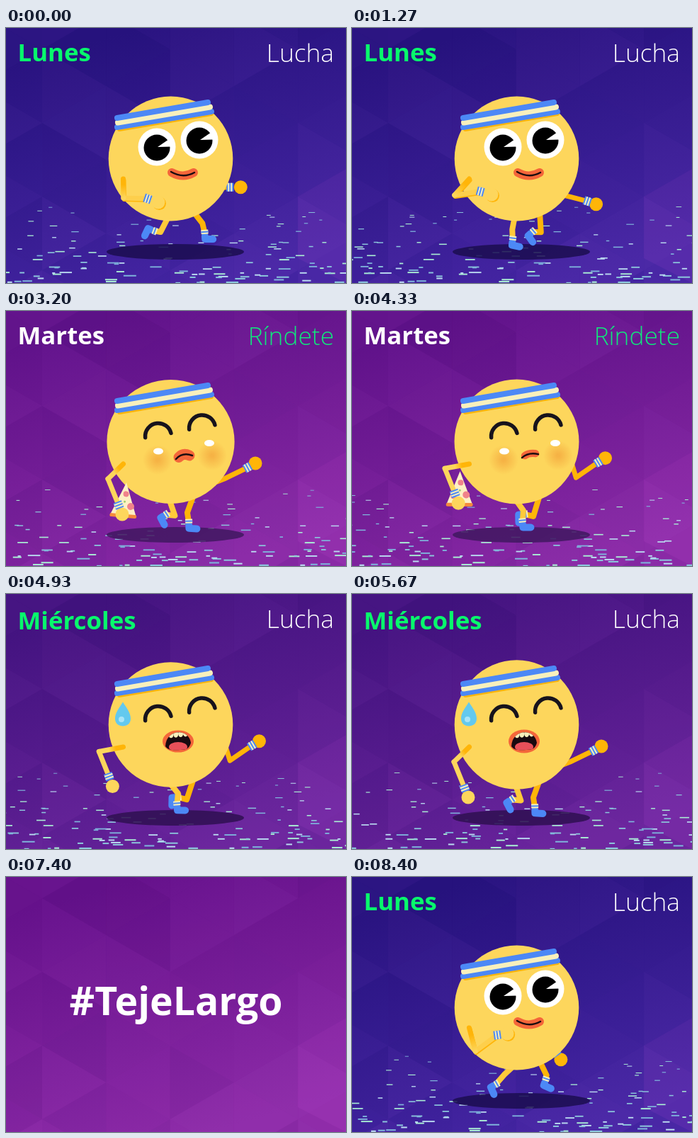
Recreate the animation shown at these times as an HTML page with a canvas. Size 480x360 px, loop 8.47 s.

```html
<!DOCTYPE html>
<html lang="es">
<head>
<meta charset="utf-8">
<style>
html, body { margin: 0; width: 100%; height: 100%; overflow: hidden; background: #2b1785; }
canvas { display: block; }
</style>
</head>
<body>
<canvas id="stage" width="480" height="360"></canvas>
<script>
const W = 480, H = 360, LOOP = 8470, STRIDE = 1400 / 3, FADE = 130;
const SKIN = '#fdd65c', ORANGE = '#ffb508', BLUE = '#4c88f6', CREAM = '#f8f0bc', LIP = '#f4663a';
const FONT = '"Open Sans", "Noto Sans", sans-serif';
const out = document.getElementById('stage').getContext('2d');
const layer = newCanvas();
let c = out;

// "ref" is a moment at which the stride phase is known; "stretch" is [wider, taller] once per stride
const scenes = [
  { start: -135, day: 'Lunes', mood: 'Lucha', pick: 0, dayY: 46.5, stretch: [0, 0], bg: ['#27127f', '#4525a3'], shade: 'rgba(28,14,80,.85)', glow: .045, ref: 0, phase: .3 },
  { start: 2635, day: 'Martes', mood: 'Ríndete', pick: 1, dayY: 46.5, stretch: [2.3, -.5], bg: ['#5f1189', '#8728a4'], shade: 'rgba(66,24,98,.88)', glow: .05, ref: 3200, phase: .49 },
  { start: 4635, day: 'Miércoles', mood: 'Lucha', pick: 0, dayY: 50, stretch: [0, 3.3], bg: ['#42127f', '#68239b'], shade: 'rgba(48,16,84,.88)', glow: .045, ref: 5670, phase: .49 },
  { start: 6635, tag: '#TejeLargo', bg: ['#64108a', '#8c2aa7'], glow: .05 }
];

// phase, knee, ankle, boot angle in degrees
const LEG = [
  [0, 229, 285, 231, 299, 0],
  [.15, 215, 279, 203, 293, 60],
  [.3, 218, 288, 208, 286, 110],
  [.5, 239, 289, 226, 288, 55],
  [.75, 252, 275, 257, 287, 0],
  [.88, 246, 280, 244, 296, -4]
];
// phase, elbow, wrist, hand
const NEAR_JOG = [
  [0, 142, 235, 179, 232, 195, 237],
  [.15, 174, 246, 205, 223, 219, 221],
  [.3, 166, 240, 200, 241, 215, 246],
  [.65, 148, 238, 186, 238, 201, 243]
];
const NEAR_TIRED = [
  [0, 130, 221, 144, 256, 149, 270],
  [.5, 144, 237, 159, 274, 164, 287]
];
// phase, shoulder, elbow, wrist, fist
const FAR_JOG = [
  [0, 296, 234, 314, 238, 338, 243, 351, 246],
  [.15, 270, 240, 280, 244, 288, 248, 295, 258],
  [.3, 298, 224, 306, 225, 316, 225, 331, 225],
  [.6, 298, 238, 312, 230, 338, 214, 352, 208],
  [.8, 298, 238, 314, 236, 342, 226, 355, 222]
];
const FAR_TIRED = [
  [0, 311, 212, 317, 235, 348, 213, 358, 207],
  [.5, 298, 241, 308, 237, 341, 221, 352, 215]
];

function newCanvas() {
  const el = document.createElement('canvas');
  el.width = W; el.height = H;
  return el.getContext('2d');
}

function random(seed) {
  return () => (seed = seed * 16807 % 2147483647) / 2147483647;
}

// Smooth cyclic curve through the keys
function pose(keys, p) {
  p -= Math.floor(p);
  const n = keys.length;
  let i = n - 1;
  while (keys[i][0] > p) i--;
  const key = k => keys[(k + n) % n];
  const at = k => key(k)[0] + Math.floor(k / n);
  const [ta, tb, tc, td] = [at(i - 1), at(i), at(i + 1), at(i + 2)];
  const d = tc - tb, u = (p - tb) / d, u2 = u * u, u3 = u2 * u;
  return key(i).slice(1).map((b, j) => {
    const a = key(i - 1)[j + 1], e = key(i + 1)[j + 1], f = key(i + 2)[j + 1];
    const m0 = (e - a) / (tc - ta) * d, m1 = (f - b) / (td - tb) * d;
    return (2 * u3 - 3 * u2 + 1) * b + (u3 - 2 * u2 + u) * m0 + (3 * u2 - 2 * u3) * e + (u3 - u2) * m1;
  });
}

// 0 at the start of a stride, 1 halfway
function swell(p) {
  return .5 - .5 * Math.cos(p * 2 * Math.PI);
}

function line(pts, width, color, cap = 'round') {
  c.beginPath();
  for (let i = 0; i < pts.length; i += 2) c.lineTo(pts[i], pts[i + 1]);
  c.lineWidth = width; c.strokeStyle = color; c.lineCap = cap; c.lineJoin = 'round';
  c.stroke();
}

function oval(x, y, rx, ry, color) {
  c.beginPath();
  c.ellipse(x, y, rx, ry, 0, 0, 7);
  c.fillStyle = color;
  c.fill();
}

function arc(x, y, r, from, to, width, color) {
  c.beginPath();
  c.arc(x, y, r, from, to);
  c.lineWidth = width; c.strokeStyle = color; c.lineCap = 'round';
  c.stroke();
}

function curve(x0, y0, cx, cy, x1, y1, width, color) {
  c.beginPath();
  c.moveTo(x0, y0);
  c.quadraticCurveTo(cx, cy, x1, y1);
  c.lineWidth = width; c.strokeStyle = color; c.lineCap = 'round';
  c.stroke();
}

function local(x, y, angle, draw) {
  c.save();
  c.translate(x, y);
  c.rotate(angle);
  draw();
  c.restore();
}

function text(str, x, y, size, weight, align, color) {
  c.font = `${weight} ${size}px ${FONT}`;
  c.textAlign = align;
  c.fillStyle = color;
  c.fillText(str, x, y);
}

function makeBackdrop(scene) {
  const g = newCanvas(), rnd = random(4711);
  const fill = g.createLinearGradient(190, 0, 290, 360);
  fill.addColorStop(0, scene.bg[0]);
  fill.addColorStop(1, scene.bg[1]);
  g.fillStyle = fill;
  g.fillRect(0, 0, W, H);
  const dx = 90.3, dy = 104;
  for (let k = -1; k < 5; k++) {
    const x = 51 + k * dx, odd = k & 1;
    for (let m = -1; m < 5; m++) {
      const y = -74 + m * dy + (odd ? 52 : 0);
      for (const [ax, ay, bx, by] of [[0, dy, dx, dy / 2], [dx, dy / 2, dx, -dy / 2]]) {
        const v = rnd();
        g.beginPath();
        g.moveTo(x, y);
        g.lineTo(x + ax, y + ay);
        g.lineTo(x + bx, y + by);
        g.fillStyle = v < .4 ? `rgba(20,0,70,${scene.glow * v * 2})` : `rgba(225,130,255,${scene.glow * (v - .4) * 1.6})`;
        g.fill();
      }
    }
  }
  g.fillStyle = `rgba(215,90,225,${scene.glow * 2})`;
  g.beginPath();
  g.moveTo(412, 238); g.lineTo(480, 199); g.lineTo(480, 360); g.lineTo(412, 325);
  g.fill();
  return g.canvas;
}

const rnd = random(90210);
const dashes = Array.from({ length: 125 }, () => {
  const near = Math.pow(rnd(), .62);
  return {
    x: rnd() * 520, y: 246 + 113 * near, w: 4 + rnd() * (5 + near * 10), h: .8 + near * 1.3,
    speed: .2 + near * .16,
    color: ['#8cc6dc', '#a9edd4', '#b9d8f0', '#7fb4dc'][Math.floor(rnd() * 4)]
  };
});

function ground(t) {
  for (const d of dashes) {
    const x = ((d.x - t * d.speed) % 520 + 520) % 520 - 20;
    c.fillStyle = d.color;
    c.fillRect(x, d.y, d.w, d.h);
  }
}

function cuff(x, y, angle) {
  local(x, y, angle, () => {
    c.fillStyle = BLUE;
    c.fillRect(-5, -6, 10, 12);
    c.fillStyle = CREAM;
    c.fillRect(-3, -6, 2, 12);
    c.fillRect(1, -6, 2, 12);
  });
}

function leg(p, hipX, hipY, shift, color) {
  const [kx, ky, ax, ay, deg] = pose(LEG, p);
  line([hipX, hipY, kx + shift, ky, ax + shift, ay], 8, color);
  local(ax + shift, ay, deg * Math.PI / 180, () => {
    line([0, 4, 0, 8, 11, 9], 10, BLUE);
    c.fillStyle = CREAM;
    c.fillRect(-5, -5, 10, 6);
    c.fillStyle = BLUE;
    c.fillRect(-5, -3, 10, 2);
  });
}

function farArm(keys, p) {
  const [sx, sy, ex, ey, wx, wy, fx, fy] = pose(keys, p);
  line([sx, sy, ex, ey, wx, wy], 7, ORANGE);
  oval(fx, fy, 9.5, 9.5, ORANGE);
  cuff(wx, wy, Math.atan2(fy - wy, fx - wx));
}

function pizza(x, y, angle) {
  local(x, y, angle, () => {
    c.beginPath();
    c.moveTo(2, -45); c.lineTo(20, 2); c.lineTo(-17, 2);
    c.fillStyle = '#fdf0c4';
    c.fill();
    line([-15, 2, 18, 2], 5, '#f58a3c');
    for (const [px, py, r] of [[3, -29, 4], [11, -12, 5], [-7, -10, 4]]) oval(px, py, r, r, '#f0838a');
    oval(2, -18, 1.5, 1.5, '#9ccf6b');
  });
}

function nearArm(keys, p, jog, slice) {
  const sx = 165.5, sy = jog ? 213 : 216, [ex, ey, wx, wy, hx, hy] = pose(keys, p);
  if (slice) pizza(hx, hy, (hx - 149) * .006);
  const upper = c.createLinearGradient(sx, sy, ex, ey);
  upper.addColorStop(.3, ORANGE);
  upper.addColorStop(jog ? 1 : .6, SKIN);
  if (jog) {
    line([sx + 1, sy + 2, ex + 1, ey + 2, wx + 1, wy + 2], 6, ORANGE);
    oval(hx + 1.5, hy + 1.5, 9.5, 9.5, ORANGE);
  }
  line([ex, ey, wx, wy], 7, jog ? '#fdcf4c' : SKIN);
  line([sx, sy, ex, ey], 7, upper);
  oval(hx, hy, 9.5, 9.5, SKIN);
  cuff(wx, wy, Math.atan2(hy - wy, hx - wx));
}

function headband() {
  line([160, 143, 290, 121], 6, ORANGE);
  line([157, 140, 290, 118], 8, BLUE);
  line([158, 133.5, 288, 111.5], 8, CREAM);
  line([157, 127, 285, 105], 8, BLUE);
}

function openEye(x, y) {
  oval(x, y, 26.5, 26.5, '#fff');
  oval(x, y + 1, 18.5, 18.5, '#000');
  c.beginPath();
  c.moveTo(x + 1, y);
  c.arc(x, y + 1, 20, -.62, -.08);
  c.fillStyle = '#fff';
  c.fill();
}

function closedEyes() {
  for (const [x, y] of [[215, 177], [277, 165.5]]) {
    arc(x, y, 18.5, Math.PI - .1, Math.PI * 2 - .25, 5.5, '#17131c');
  }
}

function blush(x, y) {
  const g = c.createRadialGradient(x, y, 2, x, y, 21);
  g.addColorStop(0, 'rgba(240,150,50,.55)');
  g.addColorStop(1, 'rgba(240,150,50,0)');
  oval(x, y, 21, 21, g);
}

function happyFace() {
  openEye(213, 168);
  openEye(273, 158);
  curve(234, 204, 250, 213, 265, 204, 12, LIP);
  curve(233, 203, 250, 213, 266, 204, 2.5, '#1c0d10');
}

function fullFace(p) {
  closedEyes();
  blush(214, 210);
  blush(291, 204);
  oval(215, 198, 7, 4.5, '#fff');
  oval(287, 186.5, 7, 4.5, '#fff');
  const chew = 5 * swell(p);
  curve(244, 204 + chew * .5, 250, 200, 259, 201 + chew * .6, 10 + chew, LIP);
  curve(240, 207 + chew * .4, 249, 199, 263, 202 + chew * .4, 2.5, '#1c0d10');
}

function tiredFace(p) {
  closedEyes();
  oval(243, 208, 22, 15.5 + swell(p), LIP);
  c.save();
  c.beginPath();
  c.moveTo(225, 215);
  c.bezierCurveTo(226, 190, 258, 189, 261, 210);
  c.bezierCurveTo(259, 217, 256, 220, 246, 220);
  c.bezierCurveTo(236, 221, 228, 220, 225, 215);
  c.clip();
  c.fillStyle = '#190a10';
  c.fillRect(215, 185, 60, 50);
  oval(243, 216, 13, 7, '#e8505a');
  for (let i = 0; i < 4; i++) oval(233 + i * 6.8, 198.5 - i * .6, 3.5, 4.8, CREAM);
  c.restore();

  local(165, 170, 0, () => {
    c.beginPath();
    c.moveTo(0, -17.5);
    c.bezierCurveTo(6, -8, 11, -2, 11, 6);
    c.bezierCurveTo(11, 20, -11, 20, -11, 6);
    c.bezierCurveTo(-11, -2, -6, -8, 0, -17.5);
    c.fillStyle = '#63c9ee';
    c.fill();
    oval(-2, 7, 4, 4, '#a8e4f8');
  });
}

const faces = [happyFace, fullFace, tiredFace];

function runner(index, p) {
  const jog = index === 0;
  const [wide, tall] = scenes[index].stretch.map(v => v * swell(p));
  farArm(jog ? FAR_JOG : FAR_TIRED, p);
  c.save();
  c.translate(0, tall * .7);
  leg(p + .5, 265, 260, 26, ORANGE);
  leg(p, 230, 265, 0, '#ffca3a');
  c.restore();
  oval(232.5, 184.5, 87.8 + wide, 88 + tall, SKIN);
  headband();
  faces[index](p);
  nearArm(jog ? NEAR_JOG : NEAR_TIRED, p, jog, index === 1);
}

function drawScene(index, t) {
  const s = scenes[index];
  s.backdrop = s.backdrop || makeBackdrop(s);
  c.drawImage(s.backdrop, 0, 0);
  if (s.tag) {
    const grow = 1 + (t - 7400) / 400 * .015;
    c.save();
    c.translate(240, 178);
    c.scale(grow, grow);
    text(s.tag, 0, 17, 55.3, 700, 'center', '#fff');
    c.restore();
    return;
  }
  ground(t);
  oval(239, 316, 97, 11, s.shade);
  runner(index, s.phase + (t - s.ref) / STRIDE);
  text(s.day, 16.5, s.dayY, 34.8, 700, 'left', s.pick ? '#fff' : '#08fa6c');
  text(s.mood, 463, 48, 35.3, 300, 'right', s.pick ? '#10e67c' : '#fff');
}

function render(t) {
  if (t > LOOP + scenes[0].start - FADE / 2) t -= LOOP;
  let i = scenes.length - 1;
  while (i > 0 && scenes[i].start - FADE / 2 > t) i--;
  const mix = (t - scenes[i].start + FADE / 2) / FADE;
  c = out;
  if (mix >= 1) return drawScene(i, t);
  drawScene((i + 3) % 4, i ? t : t + LOOP);
  c = layer;
  drawScene(i, t);
  out.globalAlpha = mix;
  out.drawImage(layer.canvas, 0, 0);
  out.globalAlpha = 1;
}

const begin = performance.now();
function tick() {
  render((performance.now() - begin) % LOOP);
  requestAnimationFrame(tick);
}
tick();
</script>
</body>
</html>
```
